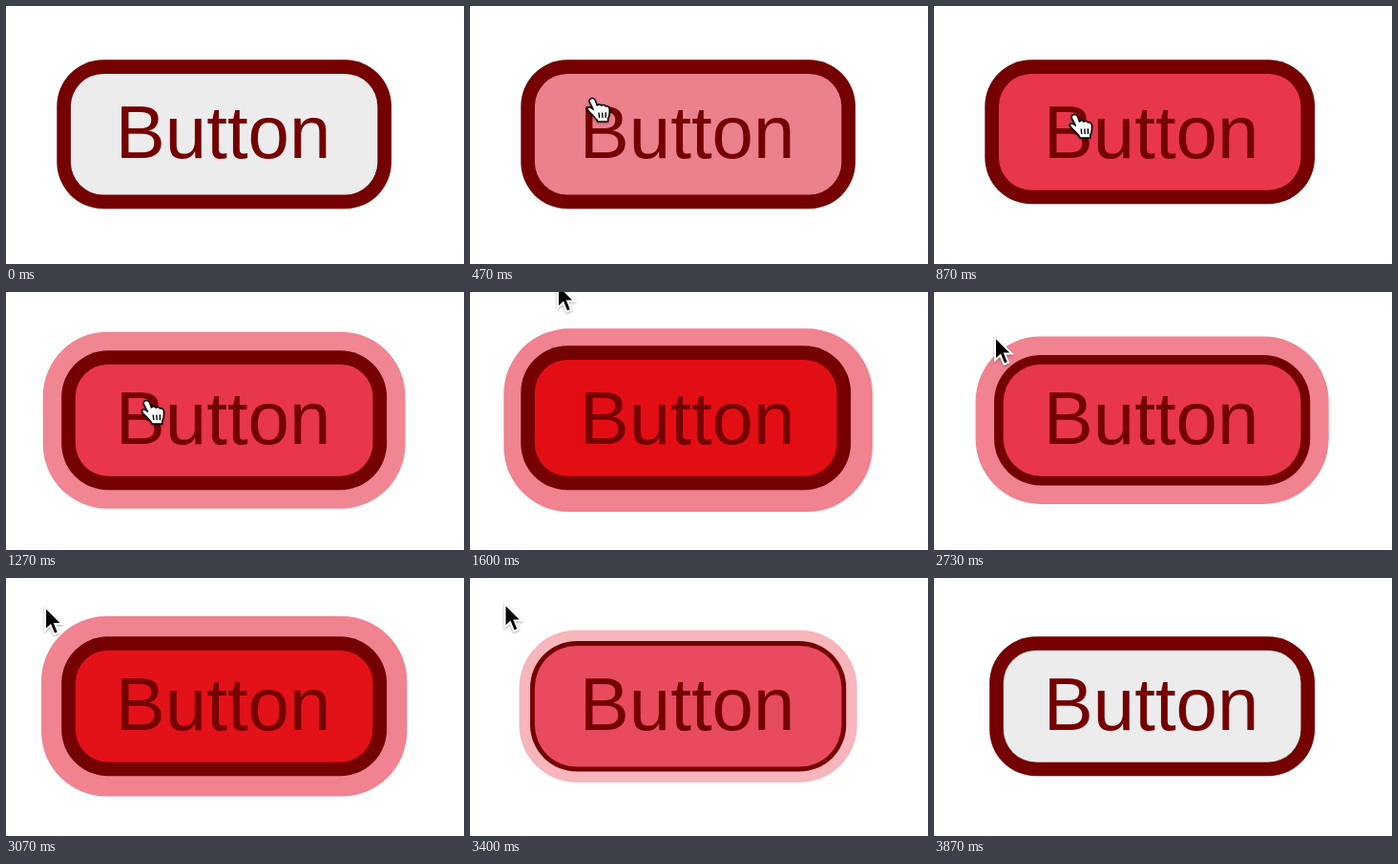
These frames come from a looping animation (480x270 px, 3.94 s). An HTML page:

```html
<!DOCTYPE html>
<html lang="en">
<head>
<meta charset="utf-8">
<title>Button states</title>
<style>
  html, body { margin: 0; width: 100%; height: 100%; overflow: hidden; background: #fff; }
  svg { display: block; width: 100vw; height: 100vh; }
  text { font: 78px "Liberation Sans", Arial, sans-serif; fill: #740000; }
  .cursor { filter: drop-shadow(0 1px 1px rgba(0, 0, 0, .35)); }
</style>
</head>
<body>
<svg viewBox="0 0 480 270">
  <rect id="halo" fill="#e8364b"/>
  <rect id="border" fill="#740000"/>
  <rect id="face"/>
  <text x="227.6" y="158.6" text-anchor="middle">Button</text>
  <g id="arrow" class="cursor">
    <path d="M0 0V24.5L5.6 19.3L9.4 28.6L14 26.7L10.2 17.6H17.6Z" fill="#000" stroke="#fff" stroke-width="2"/>
  </g>
  <g id="hand" class="cursor">
    <path d="M-1 .8C1 0 2.8 1 3.6 3L5.4 8C7 6.3 9.2 6.6 10 8.2C11.6 6.8 13.8 7.3 14.4 9C16.4 8.2 18 9.2 18.3 11.4C18.8 16 18.6 19 16.8 21.6V25H6.2C5.4 22.4 2.2 20 .2 17.6C-1.4 15.6-5.4 13.2-4.6 11C-3.6 9-.8 10 1.4 12.2L-2.6 4.4C-3.2 2.8-2.6 1.4-1 .8Z"
      fill="#fff" stroke="#000" stroke-width="1.5" stroke-linejoin="round"/>
    <path d="M7.2 15.5L7.8 21M10.8 15.5L11.2 21M14.4 15.2V21" fill="none" stroke="#000" stroke-width="1.4"/>
  </g>
</svg>
<script>
const LOOP = 3940, STEP = 200 / 3;
// The scene is a small button magnified: one of its pixels spans UNIT.
const UNIT = 4.87, RADIUS = 10 * UNIT, SPREAD = 4 * UNIT;
const BOX = { left: 53.3, top: 56.3, right: 53.3 + 72 * UNIT, bottom: 56.3 + 32 * UNIT };
const IDLE = [236, 236, 236], HOVER = [232, 54, 75], PULSE = [225, 0, 0];
const el = id => document.getElementById(id);
const [halo, border, face, arrow, hand] = ['halo', 'border', 'face', 'arrow', 'hand'].map(el);

const clamp = x => Math.min(1, Math.max(0, x));
const mix = (a, b, k) => a + (b - a) * k;
const mixColor = (a, b, k) => a.map((v, i) => mix(v, b[i], k));
const ramp = (t, start, length) => clamp((t - start) / length);

// cubic-bezier(.25, .1, .25, 1)
function ease(x) {
  let lo = 0, hi = 1;
  for (let i = 0; i < 20; i++) {
    const s = (lo + hi) / 2, r = 1 - s;
    if (.75 * r * r * s + .75 * r * s * s + s ** 3 < x) lo = s; else hi = s;
  }
  return .3 * (1 - lo) ** 2 * lo + 3 * (1 - lo) * lo * lo + lo ** 3;
}

// Time, x, y of the pointer tip
const PATH = [
  [67, 28, 7], [267, 70, 45], [533, 147, 113], [1340, 147, 113], [1600, 92, -8],
  [2000, 82, -8], [2133, 64, 47], [2733, 64, 47], [3133, 36.5, 27], [3735, 36.5, 27], [3800, 20, 22]
];

function pointer(t) {
  const i = PATH.findIndex(p => p[0] > t);
  if (i < 0) return PATH[PATH.length - 1].slice(1);
  if (i === 0) return PATH[0].slice(1);
  const [a, b] = [PATH[i - 1], PATH[i]];
  const k = (t - a[0]) / (b[0] - a[0]);
  return [mix(a[1], b[1], k), mix(a[2], b[2], k)];
}

function pulse(t) {
  if (t < 1270 || t > 3290) return 0;
  const phase = (t - 1270) % 1500 / 750;
  return phase < 1 ? ease(phase) : 1 - ease(phase - 1);
}

function setRect(node, l, t, r, b, radius) {
  const attrs = { x: l, y: t, width: r - l, height: b - t, rx: radius };
  for (const name in attrs) node.setAttribute(name, attrs[name]);
}

function draw(t) {
  const beat = pulse(t);
  const thin = 2 * ramp(t, 400, 2000) * (1 - ramp(t, 3410, 840)) * (1 - beat);

  const glow = ease(ramp(t, 960, 400)) * (1 - ease(ramp(t, 3300, 400)));
  const out = SPREAD * glow - UNIT * thin;
  setRect(halo, BOX.left - out, BOX.top - out, BOX.right + out, BOX.bottom + out, RADIUS + SPREAD * glow);
  halo.setAttribute('opacity', .62 * glow);

  // Edges snap to whole units; near and far edges round differently.
  const near = UNIT * Math.floor(thin + .4), far = UNIT * Math.floor(thin + .85);
  const width = UNIT * Math.ceil(3 - thin - 1e-6);
  const l = BOX.left + near, top = BOX.top + near, r = BOX.right - far, b = BOX.bottom - far;
  setRect(border, l, top, r, b, RADIUS);
  setRect(face, l + width, top + width, r - width, b - width, RADIUS - width);

  const warm = ease(ramp(t, 330, 400)) * (1 - ease(ramp(t, 3355, 400)));
  const color = mixColor(mixColor(IDLE, HOVER, warm), PULSE, beat);
  face.setAttribute('fill', `rgb(${color.map(Math.round)})`);

  const [x, y] = pointer(t);
  const over = x > 70 && y > 60;
  const shown = t > 60 && t < 3850;
  arrow.setAttribute('visibility', shown && !over ? 'visible' : 'hidden');
  hand.setAttribute('visibility', shown && over ? 'visible' : 'hidden');
  for (const node of [arrow, hand]) node.setAttribute('transform', `translate(${x} ${y})`);
}

const start = performance.now();
function tick() {
  const t = (performance.now() - start) % LOOP;
  draw(Math.min(58, Math.floor((t + 3.5) / STEP)) * STEP);
  requestAnimationFrame(tick);
}
tick();
</script>
</body>
</html>
```
